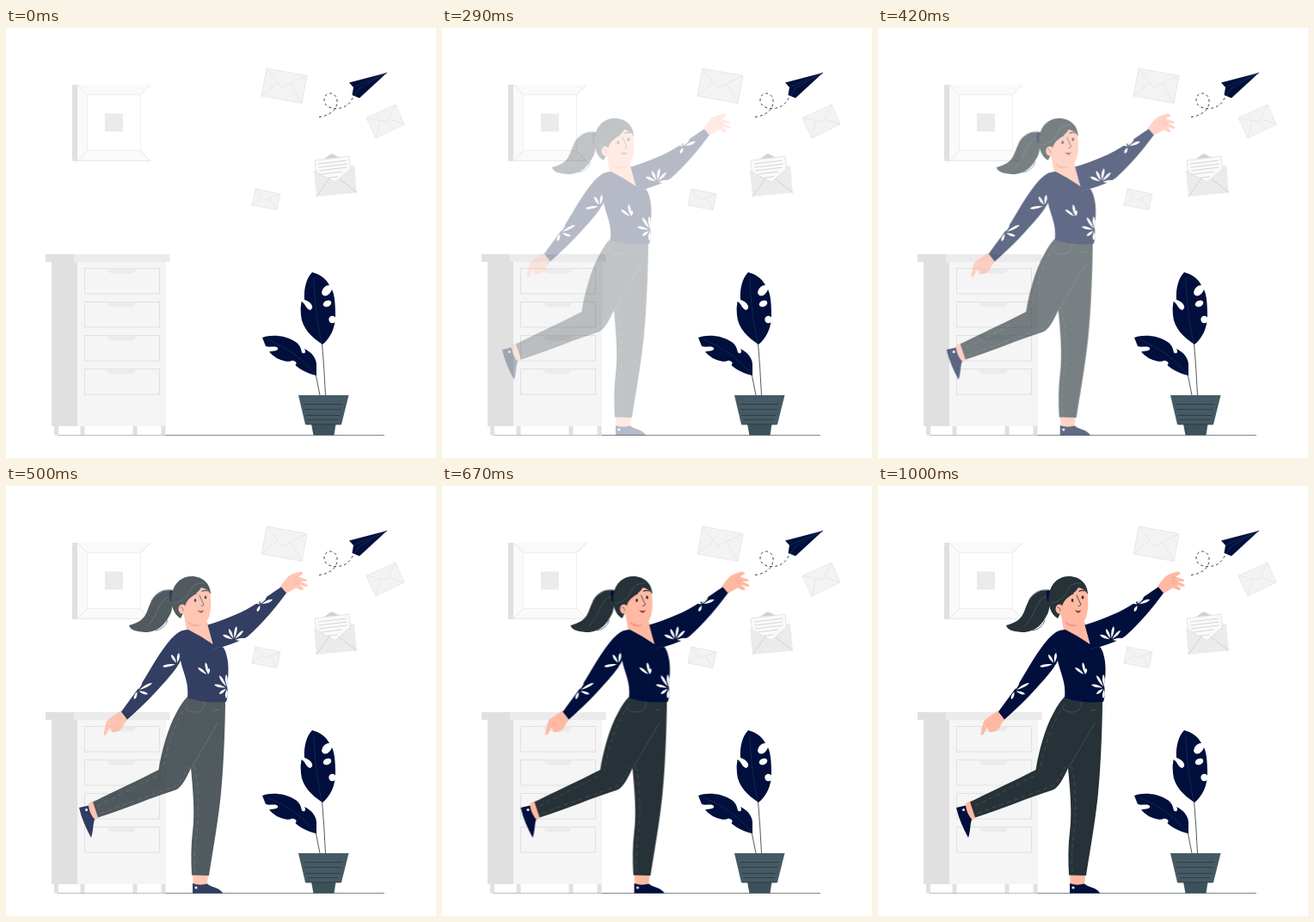
These frames come from a looping animation (500 px wide and 500 px high, 1.04 s). An HTML page:

```html
<!DOCTYPE html>
<html lang="en">
<head>
<meta charset="utf-8">
<title>Paper plane</title>
<style>
  html, body { margin: 0; width: 100%; height: 100%; overflow: hidden; background: #fff; }
  svg { display: block; width: 100vw; height: 100vh; }
  .navy { fill: #000f3c; }
  .dark { fill: #263238; }
  .skin { fill: #ffb9a2; }
  .white { fill: #fff; }
  .g1 { fill: #f5f5f5; }
  .g2 { fill: #ebebeb; }
  .g3 { fill: #e0e0e0; }
  .line { fill: none; stroke: #e0e0e0; }
  .ink { fill: none; stroke: #263238; stroke-linecap: round; stroke-linejoin: round; }
  .seam { fill: none; stroke: #52626a; stroke-width: .6; }
  .dash { stroke-dasharray: 5 4; }
  .mail path { fill: #f3f3f3; stroke: #e4e4e4; stroke-width: .8; stroke-linejoin: round; }
  .mail path + path { fill: none; }

  /* Slides in while fading, then sways; each segment advances in whole ticks. */
  #woman { animation: enter 1040ms infinite; }
  @keyframes enter {
    0%      { opacity: 0;   transform: translateX(-31px);   animation-timing-function: steps(1); }
    7.692%  { opacity: .03; transform: translateX(-30px);   animation-timing-function: steps(3); }
    20.192% { opacity: .21; transform: translateX(-25.5px); animation-timing-function: steps(4); }
    36.538% { opacity: .53; transform: translateX(-16px);   animation-timing-function: steps(3); }
    48.077% { opacity: .8;  transform: translateX(-8px);    animation-timing-function: steps(3); }
    60.577% { opacity: 1;   transform: translateX(-2px);    animation-timing-function: steps(1); }
    64.423% { opacity: 1;   transform: translateX(-1.5px);  animation-timing-function: steps(4); }
    79.808% { opacity: 1;   transform: translateX(0);       animation-timing-function: steps(4); }
    96.154% { opacity: 1;   transform: translateX(-2px);    animation-timing-function: steps(1); }
    100%    { opacity: 1;   transform: translateX(-2px); }
  }
</style>
</head>
<body>
<svg viewBox="0 0 500 500">
  <!-- picture frame -->
  <path class="g3" d="M77 66h6v88.500h-6z"/>
  <path fill="#fafafa" d="M83 66h85l-11 11.500v65l11 12H83z"/>
  <path class="white" stroke="#e8e8e8" stroke-width=".7" d="M94.500 77.500h62v65h-62z"/>
  <path class="line" stroke-width=".8" d="M83 66l11.500 11.500M168 66l-11.500 11.500M83 154.500l11.500-12M168 154.500l-11.500-12M78 154.300h90"/>
  <path class="g2" d="M115 99.500h21v21h-21z"/>

  <!-- cabinet -->
  <path class="g3" d="M53 272h30v191H53zM56 463h5v10.500h-5zM86.500 463h5v10.500h-5zM147.500 463h5v10.500h-5zM180.500 463h5v10.500h-5z"/>
  <path class="g1" d="M83 272h103v191H83z"/>
  <path class="g3" d="M46 263h34v9H46z"/>
  <path class="g2" d="M79 263h111.500v9H79z"/>
  <g id="drawers"></g>
  <path d="M60 473.500H186" stroke="#b4b8ba" stroke-width=".9"/>
  <path d="M186 473.500H440" stroke="#7f868a" stroke-width="1"/>

  <!-- letters -->
  <g class="mail">
    <path d="M303 47l47 8.500-6 32-47-8.500z"/>
    <path d="M303 47l17.500 22.500L350 55.500M297 79l18-15M344 87.500L331 65"/>
  </g>
  <g class="mail">
    <path d="M419 104.500L453 89l10 23-33 16z"/>
    <path d="M419 104.500l24 4.500 10-20M430 128l5-20.500M463 112l-17-6"/>
  </g>
  <g class="mail">
    <path d="M290 187l29 6-4 18.500-29-5.500z"/>
    <path d="M290 187l11 13 18-7M286 206l11-9M315 211.500l-8-14"/>
  </g>
  <path fill="#d2d2d2" d="M370 152l7-5q2-1.500 4 0l8 4z"/>
  <path class="g2" d="M358 166l47-6 3 31.500-47 4.500z"/>
  <path fill="#fafafa" stroke="#d8d8d8" stroke-width=".7" d="M359 154l40-5 1.500 15-17.500 15.500-22.500-12z"/>
  <path class="line" stroke-width=".8" style="stroke:#ccc" d="M363 158l33-4M363.500 162l33-4M364 166l32-4M367 170l24-3M374 174.300l12-1.500M361 196l15-21M408 191.500L388 176"/>

  <!-- paper plane -->
  <path class="navy" d="M443 52l-44 11.500 5 5.500-1.500 9L405 79l6 2.500z"/>
  <path class="seam" style="stroke:#26355f" d="M443 52l-39 17M443 52l-32 18-6 9"/>
  <path class="ink" stroke-width=".9" stroke-dasharray="3 3" style="stroke-linecap:butt" d="M364 103.500C375 102 386 96 385 84C384 74 371 73 370 83C369.500 94 384 95 391 92.500C398 90 401 86 404 79.500"/>

  <!-- plant -->
  <path class="ink" stroke-width=".8" d="M367.500 366Q370 395 371.500 427M360 402L365 427"/>
  <path class="navy" d="M368 368C356 360 344 349 343 334Q342 325 343.500 318C348 320 349 327 353.500 328C359 326 356 319 347 316C346 304 349 291 356 284C364 286 372 291 376 299C372 299 368 302 367 308C369 314 376 312 379 304C382 310 383 320 383 334C383 349 377 361 368 368Z"/>
  <ellipse class="white" cx="373.500" cy="320.500" rx="5" ry="3.500" transform="rotate(-25 373.500 320.500)"/>
  <circle class="white" cx="379.500" cy="339" r="4.200"/>
  <path class="navy" d="M361 404C352 402 343 398 336.500 392Q340 388 333 386.500Q330 388.500 325 387.500Q313 385 306 376.500C311 375 317 376 316 372C313 369 307 372 302 370L298 360C308 356 324 357 335 364C341 367 343 372 344 377.500C348 380 349 376 347 373C356 377 361 385 361 391Z"/>
  <path class="seam" style="stroke:#26355f" d="M367 366Q359 330 358 290M359 402Q340 377 304 362"/>
  <path fill="#455a64" d="M340 427h58.500l-8.500 34h-42z"/>
  <path fill="#3d515b" d="M355 460.500h28.500l-2 13h-24z"/>
  <path class="ink" stroke-width=".7" d="M347 437.500h44M347.500 443.500h42M349 450.500h39M351 455.500h35M349 461h40"/>

  <g id="woman">
    <!-- feet -->
    <path class="skin" d="M225 451h18l-1 14h-16zM104 369l8-4 5 19-6 5C107 384 104 376 104 369z"/>
    <path class="navy" d="M225 473.500V462Q233 465 242 462.500C247 467 257 467 260 473.500zM93 374l11-2.500C105 380 109 385 111 387.500C109 394 109.500 402 107 409C101 398 96 387 93 374z"/>
    <circle class="white" cx="229" cy="467" r="1.500"/>
    <circle class="white" cx="101.500" cy="376.500" r="1.500"/>

    <!-- trousers -->
    <path class="dark" d="M219 245L263 249C263 275 261 330 258 357C255 388 248 428 244 453L224 452.500C223 435 223 418 225 402C228 380 225 350 223 328C218 339 212 351 205 353.500C178 362 145 376 115 385.500L109 367.500C132 356 164 341 185.500 330C189 308 196 282 206 264Q212 252 219 245Z"/>
    <path class="seam" d="M254 276Q239 301 223.500 328M216 259Q226 266 235 261Q239 257 239 250M249 261l7-1"/>
    <path class="seam dash" d="M118 381C150 368 182 358 204 349Q214 341 220 326M219 254Q200 281 190 331M115 372Q150 354 186 336M228 448Q226 425 231 394Q233 350 227 326"/>

    <!-- ponytail -->
    <path class="dark" d="M203 122C190 119 181 126 176 136C171 146 172 157 151 162C152 168 162 170 173 170C187 168 193 160 198 151C202 145 200 140 204 134Z"/>
    <path class="ink" stroke-width=".7" d="M201 121C188 119 180 127 177 134M196 156Q193 166 182 168"/>
    <path class="seam" d="M200 127C184 132 186 151 172 163"/>
    <path class="navy" d="M198 122q4-2 5 1l1 10q-3 3-5 1q-2-6-1-12z"/>

    <!-- neck and face -->
    <path class="skin" d="M214 145L218 168L248 185L243 160L238 152Z"/>
    <path class="skin" d="M213 128C220 112 240 111 245 123C247 133 247 146 243 155C240 161 229 162 221 158Q213 153 213 140Z"/>
    <path d="M220 157.500Q226 162 235 161.500Q228 166 220 160Z" fill="#f29d86"/>
    <path class="dark" d="M211 154C202 149 199 136 201 126C203 112 213 105 224 105C237 105 246 114 246 126Q242 119 235 118C231 126 221 128 217 137Q216 143 213 150Z"/>
    <path class="seam" d="M203 137Q219 133 224 118Q230 112 238 113"/>
    <ellipse class="skin" cx="213" cy="143" rx="4.500" ry="5.500"/>
    <path class="ink" stroke-width=".6" d="M211 141q3 0 3 4"/>
    <path class="ink" stroke-width="1.100" d="M222.500 129q3-4 6.500-3.500M236 122.500q3-2 6-.5"/>
    <path class="ink" stroke-width=".8" d="M233 127Q236 134 238 138Q237 140 235 139.500"/>
    <ellipse class="dark" cx="228" cy="133" rx="1.300" ry="1.900"/>
    <ellipse class="dark" cx="240" cy="129.500" rx="1.300" ry="1.900"/>
    <path d="M231 144q4 2.500 7 0q-1 4-4 3.500q-2-.5-3-3.500z" fill="#8c3a3a"/>

    <!-- hands -->
    <path class="skin" d="M326 118C331 112 335 104 342 102L350 99.500Q355 100 353 102.500L348 105.500L357 108.500Q359.500 110 357 111L350 110.500L358 114.500Q360 117 356 117L349 114.500L354 119Q354 122 351 121L345 118.500Q339 122 334 125Z"/>
    <path class="skin" d="M142 261L133 267Q126 271 124.500 275L121.500 288Q122 291 124.500 289L129 280L131 286Q134 287 139 285Q144 282 145 277L150 271Z"/>
    <path class="ink" stroke-width=".4" style="stroke:#d98872" d="M348 105.500l-5 2M350 110.500l-6-1M349 114.500l-5-2M129 280l3-4"/>

    <!-- sweater -->
    <path class="navy" d="M220 167Q211 167 205 173C193 183 180 206 168 226C160 239 150 251 142 262.500L149 271.500C160 262 175 248 188 233C198 222 207 212 211 203C214 218 221 228 219 246.500Q240 253 264 251Q267 243 265 232C267 220 267 207 265 199Q263 190 260 187Q280 181 289 175C306 160 321 142 334 124.500L328 117.500C312 128 292 143 275 149.500Q258 157 242.500 161.500L248.500 184Q234 174 220 167Z"/>
    <path class="seam" style="stroke:#26355f" d="M211 203Q210 192 207 187M260 187Q254 187 249 190"/>
    <g id="sprigs" class="white"></g>
  </g>
</svg>
<script>
  const add = (id, name, attrs) => {
    const el = document.createElementNS('http://www.w3.org/2000/svg', name);
    for (const key in attrs) el.setAttribute(key, attrs[key]);
    document.getElementById(id).append(el);
  };

  for (let i = 0; i < 4; i++) {
    const y = 279.5 + i * 39;
    add('drawers', 'rect', { class: 'line', x: 91.5, y, width: 87, height: 29.5 });
    add('drawers', 'path', { class: 'g2', d: `M118 ${y}h33q-1 6-6 6h-21q-5 0-6-6z` });
  }

  // Teardrop petals fan out from a shared base point.
  function sprig(x, y, tips) {
    for (const [tx, ty] of tips) {
      const dx = tx - x, dy = ty - y, len = Math.hypot(dx, dy);
      const nx = -dy / len * 3, ny = dx / len * 3;
      const sx = x + dx * .12, sy = y + dy * .12;
      const mx = x + dx * .75, my = y + dy * .75;
      add('sprigs', 'path', {
        d: `M${sx} ${sy}Q${mx + nx} ${my + ny} ${tx} ${ty}Q${mx - nx} ${my - ny} ${sx} ${sy}Z`
      });
    }
  }
  sprig(161, 238, [[153, 234], [166, 227], [178, 229], [173, 242], [157, 248]]);
  sprig(207, 207, [[190, 210], [200, 196], [209, 194], [212, 213]]);
  sprig(243, 220, [[231, 211], [240, 205], [244, 212]]);
  sprig(265, 235, [[256, 220], [250, 231], [256, 242], [264, 247], [264, 219]]);
  sprig(273, 179, [[260, 173], [267, 166], [276, 163], [284, 168], [287, 178]]);
  sprig(304, 138, [[298, 134], [305, 129], [311, 127], [318, 132], [300, 146]]);
</script>
</body>
</html>
```
